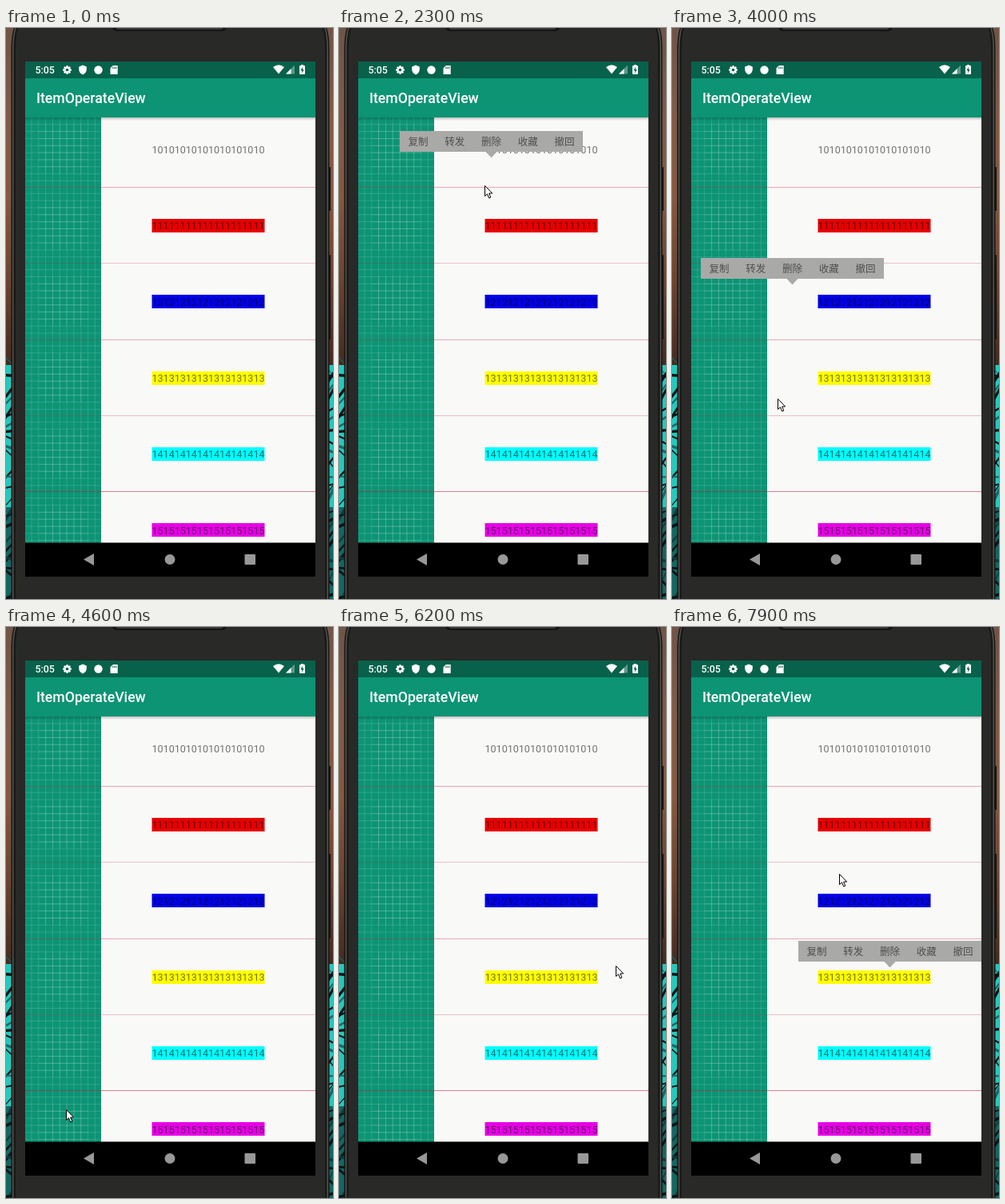
Write an HTML page with a canvas that moves like this. It is 409 px wide and 715 px high and loops after 8000 ms.

```html
<!DOCTYPE html>
<html lang="zh-CN">
<head>
<meta charset="utf-8">
<title>ItemOperateView</title>
<style>
html, body { margin: 0; width: 100%; height: 100%; overflow: hidden; background: #222; }
canvas { display: block; }
</style>
</head>
<body>
<canvas id="stage" width="409" height="715"></canvas>
<script>
const ctx = document.getElementById('stage').getContext('2d');
const LOOP = 8000, STEP = 100;
const GREEN = '#0c9474';
const SCREEN = { left: 24, right: 387, top: 42, bottom: 687 };
const ROW = { top: 104, height: 95.35 };
const MENU = { width: 229, height: 26, items: ['复制', '转发', '删除', '收藏', '撤回'] };
const chips = [null, '#e60000', '#0000e6', '#ffff00', '#00ffff', '#e600e6'];
const dividerAlpha = [0.36, 0.25, 0.36, 0.27, 0.55];

// time, x, y of the pointer tip
const pointerPath = [
  [400, 24, 478], [600, 50, 400], [800, 90, 255], [1000, 122, 140], [1100, 134, 125],
  [1200, 146, 132], [1300, 182, 157], [1400, 189, 162], [1600, 191, 160],
  [2200, 191, 160], [2500, 163, 270], [2700, 150, 320],
  [3800, 150, 320], [4050, 128, 500], [4350, 92, 646], [4600, 75, 604],
  [5300, 75, 604], [5500, 220, 530], [5700, 332, 439], [6000, 344, 425], [6200, 346, 424],
  [7300, 346, 424], [7600, 286, 363], [7900, 209, 309]
];

// popups: anchor centre, top edge, and when they start and stop showing
const popups = [
  { x: 190.5, y: 129, from: 2100, to: 3000, fade: true },
  { x: 150.5, y: 288, from: 3500, to: 4600 },
  { x: 75, y: 573.5, from: 5100, to: 6200 },
  { x: 346, y: 393, from: 6700, to: LOOP }
];

const clamp = (v, lo, hi) => Math.min(hi, Math.max(lo, v));
const noise = n => { const v = Math.sin(n * 127.1) * 43758.5453; return v - Math.floor(v); };

function rect(color, x, y, w, h) {
  ctx.fillStyle = color;
  ctx.fillRect(x, y, w, h);
}

function poly(color, ...pts) {
  ctx.fillStyle = color;
  ctx.beginPath();
  for (let i = 0; i < pts.length; i += 2) ctx.lineTo(pts[i], pts[i + 1]);
  ctx.closePath();
  ctx.fill();
}

function disc(color, x, y, r) {
  ctx.fillStyle = color;
  ctx.beginPath();
  ctx.arc(x, y, r, 0, Math.PI * 2);
  ctx.fill();
}

function rounded(color, x, y, w, h, r) {
  ctx.fillStyle = color;
  ctx.beginPath();
  ctx.roundRect(x, y, w, h, r);
  ctx.fill();
}

function line(color, width, x1, y1, x2, y2) {
  ctx.strokeStyle = color;
  ctx.lineWidth = width;
  ctx.beginPath();
  ctx.moveTo(x1, y1);
  ctx.lineTo(x2, y2);
  ctx.stroke();
}

function label(text, font, color, x, y, align = 'left') {
  ctx.font = font;
  ctx.fillStyle = color;
  ctx.textAlign = align;
  ctx.fillText(text, x, y);
}

function fade(x1, y1, x2, y2, ...colors) {
  const g = ctx.createLinearGradient(x1, y1, x2, y2);
  colors.forEach((c, i) => g.addColorStop(i / (colors.length - 1), c));
  return g;
}

function drawWallpaper() {
  rect(fade(0, 0, 0, 425, '#6f5447', '#805a47', '#85583f', '#6b432f', '#432a20'), 0, 0, 409, 425);
  rect('#23c9bd', 0, 422, 409, 293);
  for (let i = 0; i < 26; i++) {
    const y = 424 + i * 11.5, lean = noise(i) * 34 - 12;
    const color = i % 3 ? '#0a1517' : '#176a69';
    const width = 1 + noise(i + 40) * 3;
    line(color, width, -1, y + lean, 11, y);
    line(color, width, 400, y, 410, y - lean);
  }
  rect('rgba(8,22,24,.55)', 0, 600, 409, 115);
}

function drawPhone() {
  rounded('#151515', 402, 174, 4, 55, 1);
  rounded('#151515', 402, 284, 4, 106, 1);
  const body = [[6.5, '#171716'], [8, '#53534f'], [9.5, '#191918'], [12, '#292927']];
  for (const [inset, color] of body) {
    ctx.fillStyle = color;
    ctx.beginPath();
    ctx.moveTo(inset + 4, -2);
    ctx.quadraticCurveTo(inset, 8, inset, 26);
    ctx.lineTo(inset, 716);
    ctx.lineTo(411 - inset, 716);
    ctx.lineTo(411 - inset, 26);
    ctx.quadraticCurveTo(411 - inset, 8, 407 - inset, -2);
    ctx.fill();
  }
  rounded('#151515', 133, -8, 143, 12, 5);
  rounded('#3a3a38', 137, -8, 135, 10, 4);
}

function drawStatusBar() {
  rect('#07614b', SCREEN.left, SCREEN.top, 363, 21);
  label('5:05', '500 12.4px Roboto, sans-serif', '#fff', 36.5, 57);

  // gear
  for (let i = 0; i < 4; i++) {
    const a = i * Math.PI / 4, dx = Math.cos(a) * 5.4, dy = Math.sin(a) * 5.4;
    line('#fff', 2.2, 76.5 - dx, 52.5 - dy, 76.5 + dx, 52.5 + dy);
  }
  disc('#fff', 76.5, 52.5, 4.3);
  disc('#07614b', 76.5, 52.5, 1.8);

  // shield
  ctx.fillStyle = '#fff';
  ctx.beginPath();
  ctx.moveTo(96, 46.5);
  ctx.lineTo(100.8, 48.5);
  ctx.lineTo(100.8, 52);
  ctx.quadraticCurveTo(100.5, 56.5, 96, 58.5);
  ctx.quadraticCurveTo(91.5, 56.5, 91.2, 52);
  ctx.lineTo(91.2, 48.5);
  ctx.fill();

  disc('#fff', 115.5, 52.5, 5.2);

  // memory card
  poly('#fff', 133.8, 47, 139.7, 47, 139.7, 58, 130.5, 58, 130.5, 50.3);
  for (let i = 0; i < 3; i++) rect('#07614b', 133.3 + i * 2, 48.7, 1, 2.3);

  // wifi, signal, battery
  ctx.fillStyle = '#fff';
  ctx.beginPath();
  ctx.moveTo(341, 57.5);
  ctx.lineTo(334, 49);
  ctx.quadraticCurveTo(341, 43.5, 348, 49);
  ctx.fill();
  poly('rgba(255,255,255,.35)', 350, 57.5, 361, 57.5, 361, 46.5);
  poly('#fff', 350, 57.5, 356.5, 57.5, 356.5, 51);
  rect('#fff', 369, 46, 3, 2);
  rounded('#fff', 367, 47, 7, 11, 1);
  poly('#07614b', 371, 48.8, 368.5, 53.2, 370.2, 53.2, 370.2, 56.5, 372.7, 52, 371, 52);
}

function drawGrid(top) {
  const k = ROW.height / 108, color = 'rgba(255,255,255,.2)';
  rect(GREEN, SCREEN.left, top, 95, ROW.height + 0.5);
  ctx.save();
  ctx.translate(SCREEN.left, top);
  ctx.scale(k, k);
  for (let p = 9; p < 108; p += 10) {
    line(color, 0.8, p, 0, p, 108);
    line(color, 0.8, 0, p, 108, p);
    if (p > 19 && p < 89) {
      line(color, 0.8, p, 19, p, 89);
      line(color, 0.8, 19, p, 89, p);
    }
  }
  ctx.restore();
}

function drawList() {
  ctx.save();
  ctx.beginPath();
  ctx.rect(SCREEN.left, 112, 363, 533);
  ctx.clip();
  rect('#f9f9f8', SCREEN.left, 112, 363, 533);
  chips.forEach((chip, i) => {
    const top = ROW.top + i * ROW.height, mid = top + 48.2;
    drawGrid(top);
    if (chip) rect(chip, 182.5, Math.round(mid - 8.5), 141, 17);
    label(String(10 + i).repeat(10), '12.55px Roboto, sans-serif', 'rgba(0,0,0,.54)', 253, Math.round(mid + 4.6), 'center');
  });
  dividerAlpha.forEach((alpha, i) => {
    const y = Math.floor(ROW.top + (i + 1) * ROW.height);
    rect(`rgba(190,30,55,${alpha})`, SCREEN.left, y, 363, 1);
  });
  rect(fade(0, 112, 0, 116, 'rgba(0,0,0,.24)', 'rgba(0,0,0,0)'), SCREEN.left, 112, 363, 4);
  ctx.restore();
}

function drawNavBar() {
  rect('#000', SCREEN.left, 644.5, 363, 42.5);
  poly('#989898', 97, 665.5, 110, 658, 110, 673);
  disc('#989898', 205, 665.5, 6.5);
  rounded('#989898', 298.5, 659, 13.5, 13, 1);
}

function drawPopup({ x, y }, alpha) {
  const left = clamp(x - MENU.width / 2, SCREEN.left, SCREEN.right - MENU.width);
  const mid = left + MENU.width / 2, slot = MENU.width / MENU.items.length;
  ctx.globalAlpha = alpha;
  rect('#a9a9a8', left, y, MENU.width, MENU.height);
  poly('#a9a9a8', mid - 7, y + 26, mid + 7, y + 26, mid, y + 33.5);
  MENU.items.forEach((item, i) => {
    label(item, '12.5px "Noto Sans CJK SC", "Noto Sans CJK", sans-serif', '#4e4e4d', left + slot * (i + 0.5), y + 18, 'center');
  });
  ctx.globalAlpha = 1;
}

function popupAlpha({ from, to, fade }, t) {
  if (t < from || t > to || (t === to && !fade)) return 0;
  return t === from || t === to ? 0.55 : 1;
}

function pointerAt(t) {
  const next = pointerPath.findIndex(p => p[0] > t);
  if (next === 0) return null;
  if (next < 0) return pointerPath.at(-1).slice(1);
  const [t0, x0, y0] = pointerPath[next - 1], [t1, x1, y1] = pointerPath[next];
  const k = (t - t0) / (t1 - t0);
  return [x0 + (x1 - x0) * k, y0 + (y1 - y0) * k];
}

function drawPointer([x, y]) {
  ctx.save();
  ctx.translate(Math.round(x) + 0.5, Math.round(y) + 0.5);
  ctx.lineWidth = 1;
  ctx.strokeStyle = '#000';
  poly('#fff', 0, 0, 0, 13, 3, 10.3, 5.2, 15.5, 7.3, 14.6, 5.2, 9.5, 9.2, 9.5);
  ctx.stroke();
  ctx.restore();
}

function draw(t) {
  drawWallpaper();
  drawPhone();
  drawStatusBar();
  rect(GREEN, SCREEN.left, 63, 363, 49);
  label('ItemOperateView', '500 17.66px Roboto, sans-serif', '#fff', 38, 94);
  drawList();
  drawNavBar();
  for (const popup of popups) {
    const alpha = popupAlpha(popup, t);
    if (alpha) drawPopup(popup, alpha);
  }
  const pointer = pointerAt(t);
  if (pointer) drawPointer(pointer);
}

const start = performance.now();
function tick() {
  const elapsed = (performance.now() - start) % LOOP;
  draw(Math.floor(elapsed / STEP) * STEP);
  requestAnimationFrame(tick);
}
tick();
</script>
</body>
</html>
```
